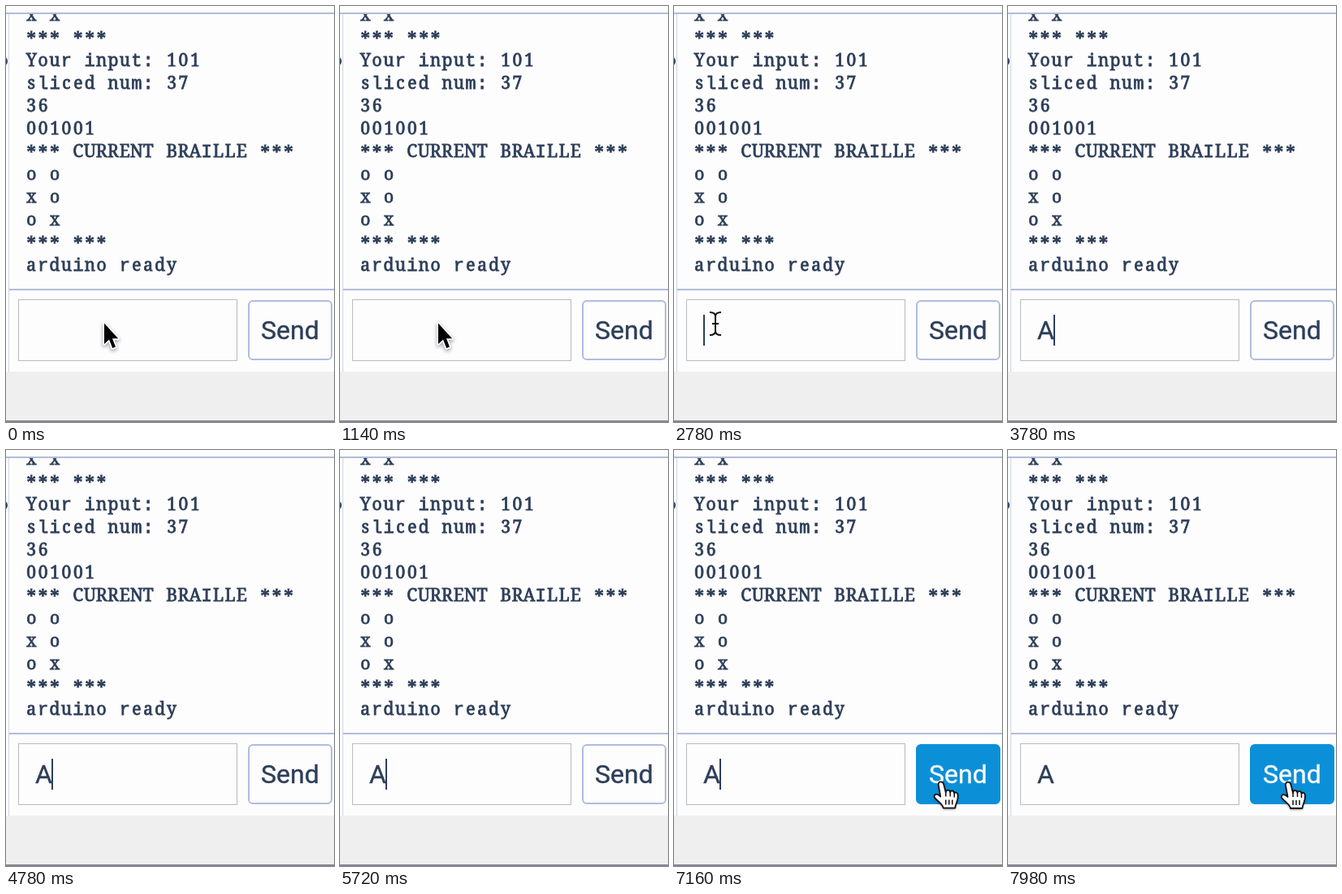
Write an HTML page with a canvas that moves like this. It is 404 px wide and 512 px high and loops after 8000 ms.

```html
<!DOCTYPE html>
<html lang="en">
<head>
<meta charset="utf-8">
<title>Serial monitor</title>
<style>
  html, body { margin: 0; width: 100%; height: 100%; overflow: hidden; background: #efeff0; }
  canvas { display: block; }
</style>
</head>
<body>
<canvas id="stage" width="404" height="512"></canvas>
<script>
const ctx = document.getElementById('stage').getContext('2d');
const LOOP = 8000;
const PAPER = '#fdfdfd', RULE = '#afbddb', INK = '#2d3e58', BLUE = '#0b90d8';
const UI_FONT = '32px Roboto, sans-serif';

const LOG = [
  'x x', '*** ***', 'Your input: 101', 'sliced num: 37', '36', '001001',
  '*** CURRENT BRAILLE ***', 'o o', 'x o', 'o x', '*** ***', 'arduino ready'
];

// Times in ms
const MOVE_TO_FIELD = [1400, 2200], FOCUS = 2300, TYPE = 3500;
const MOVE_TO_BUTTON = [5960, 6640], HOVER = 6780, MOVE_ON_BUTTON = [6700, 7500], BLUR = 7700;

const ARROW = new Path2D('M0 0V25.5L6 20L10.2 30.5L14 29L10 18.8H17.2Z');
const BEAM = new Path2D('M-7-14Q0-14 0-9Q0-14 7-14M0-9V9M-7 14Q0 14 0 9Q0 14 7 14M-4 0H4');
const HAND = new Path2D('M-3 4C-4-1 2-2 3.5 3L6 13C6 9 11 9 11.5 13C12 10 16 10 16.5 14' +
  'C18 11.5 21 13 21 17C21 25 18 26 17.5 32H3C2 27-4 24-8 19C-9 14-4 14-0.5 18Z');
const FINGERS = new Path2D('M6 13V18M11.5 13V18M16.5 14V19M6 22V28M10 22V28M14 22V28');

function rect(x, y, w, h, color) {
  ctx.fillStyle = color;
  ctx.fillRect(x, y, w, h);
}

// The thin stroke gives the letters their slightly heavy weight.
function text(string, x, y, font, color, weight = 0.4) {
  ctx.font = font;
  ctx.fillStyle = ctx.strokeStyle = color;
  ctx.lineWidth = weight;
  ctx.fillText(string, x, y);
  ctx.strokeText(string, x, y);
}

// Typewriter look: slab letters on a fixed grid, narrow and wide ones from the mono font.
function glyphStyle(char) {
  if (char === '*') return ['23px "Noto Serif", serif', 3];
  if (/[filmrtwI:]/.test(char)) return ['22px "Liberation Mono", monospace', 0];
  return ['21px "Noto Serif", serif', 0];
}

function drawLog() {
  ctx.save();
  ctx.beginPath();
  ctx.rect(4, 10, 400, 338);
  ctx.clip();
  ctx.textAlign = 'center';
  LOG.forEach((line, row) => [...line].forEach((char, column) => {
    const [font, drop] = glyphStyle(char);
    text(char, 31.2 + 14.4 * column, 18 + 28 * row + drop, font, INK, 0.8);
  }));
  ctx.restore();
}

function drawPanel() {
  rect(0, 0, 404, 512, PAPER);
  rect(0, 8, 404, 2, RULE);
  rect(3, 10, 1, 440, '#cfd5e2');
  rect(4, 348, 400, 2, RULE);
  rect(0, 450, 404, 60, '#efeff0');
  rect(0, 510, 404, 2, '#858794');
  ctx.beginPath();
  ctx.arc(-4, 68, 5, -1.2, 1.2);
  ctx.strokeStyle = INK;
  ctx.lineWidth = 2;
  ctx.stroke();
}

function drawField(t) {
  ctx.strokeStyle = '#b9bcb8';
  ctx.lineWidth = 1;
  ctx.strokeRect(15.5, 361.5, 269, 75);
  const typed = t >= TYPE;
  if (typed) text('A', 36, 410, UI_FONT, INK);
  if (t >= FOCUS && t < BLUR) rect(typed ? 56 : 36, 380, 2, 38, INK);
}

function drawButton(hovered) {
  ctx.beginPath();
  ctx.roundRect(299, 363, 102, 72, 5);
  ctx.fillStyle = hovered ? BLUE : PAPER;
  ctx.fill();
  ctx.lineWidth = 2;
  ctx.strokeStyle = hovered ? BLUE : RULE;
  ctx.stroke();
  text('Send', 314, 410, UI_FONT, hovered ? PAPER : INK);
}

function glide(t, [start, end], from, to) {
  const p = Math.min(1, Math.max(0, (t - start) / (end - start)));
  const eased = p * p * (3 - 2 * p);
  return from.map((value, i) => value + (to[i] - value) * eased);
}

function outline(path, color, width) {
  ctx.strokeStyle = color;
  ctx.lineWidth = width;
  ctx.stroke(path);
}

function castShadow(blur) {
  ctx.shadowColor = 'rgba(60,60,90,.5)';
  ctx.shadowBlur = blur;
  ctx.shadowOffsetY = 2;
}

function drawPointer(t) {
  if (t >= TYPE && t < MOVE_TO_BUTTON[0]) return;
  ctx.save();
  ctx.lineJoin = 'round';
  if (t < MOVE_TO_FIELD[0]) {
    ctx.translate(121, 390.5);
    castShadow(4);
    outline(ARROW, '#fff', 3.5);
    ctx.shadowColor = 'transparent';
    ctx.fillStyle = '#000';
    ctx.fill(ARROW);
  } else if (t < HOVER) {
    const position = t < TYPE
      ? glide(t, MOVE_TO_FIELD, [120, 400], [51, 391])
      : glide(t, MOVE_TO_BUTTON, [51, 391], [303, 410]);
    ctx.translate(...position);
    outline(BEAM, PAPER, 4);
    outline(BEAM, '#111', 2);
  } else {
    ctx.translate(...glide(t, MOVE_ON_BUTTON, [303, 408], [345, 409]));
    castShadow(3);
    ctx.fillStyle = '#fff';
    ctx.fill(HAND);
    ctx.shadowColor = 'transparent';
    outline(HAND, '#111', 1.8);
    outline(FINGERS, '#111', 1.5);
  }
  ctx.restore();
}

function draw() {
  const t = performance.now() % LOOP;
  drawPanel();
  drawLog();
  drawField(t);
  drawButton(t >= HOVER);
  drawPointer(t);
  requestAnimationFrame(draw);
}
draw();
</script>
</body>
</html>
```
